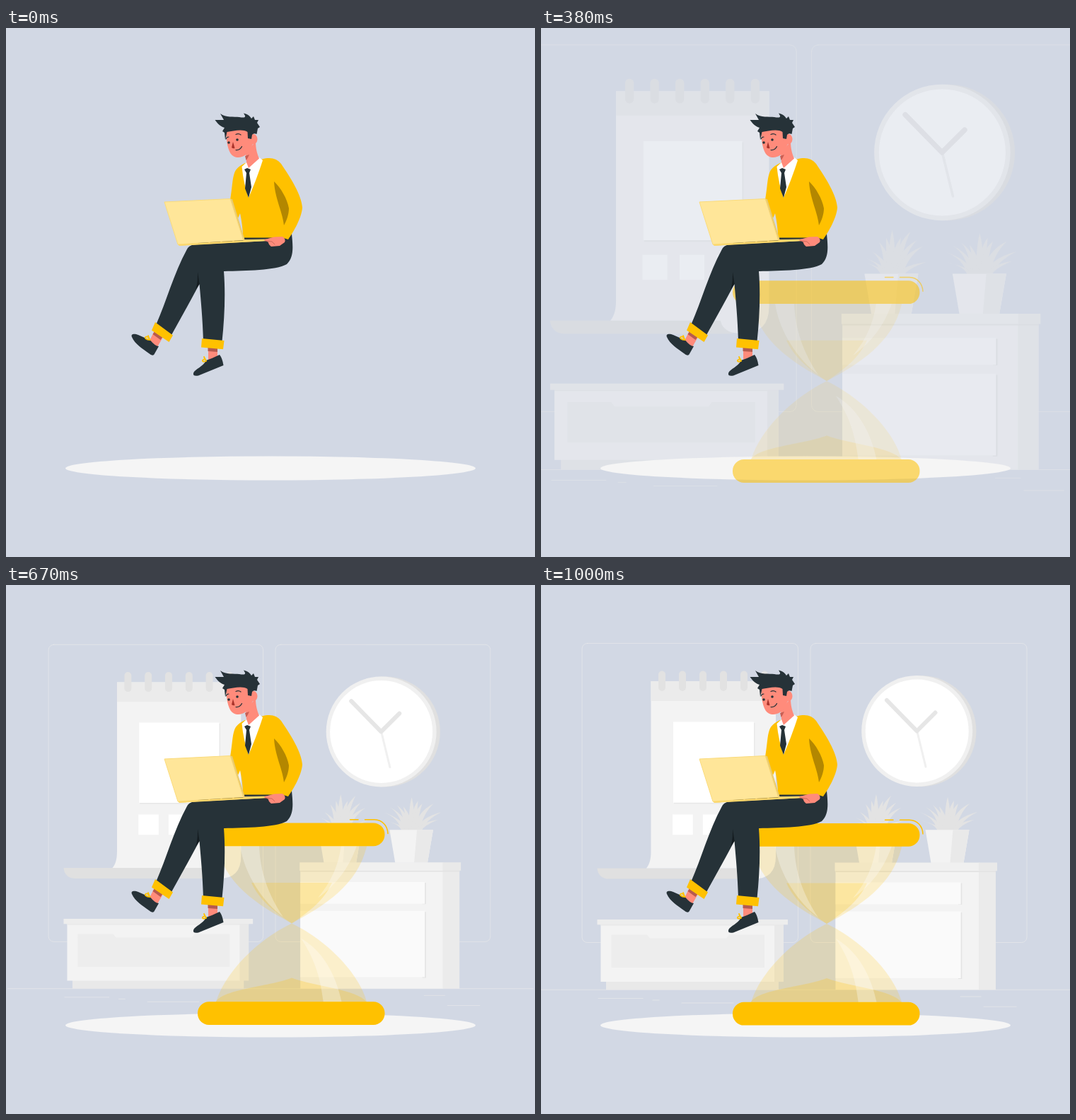
An HTML page that plays this animation: 748 by 748 pixels, repeating every 1040 ms.

```html
<!DOCTYPE html>
<html lang="en">
<head>
<meta charset="utf-8">
<title>Working on an hourglass</title>
<style>
  html, body { margin: 0; width: 100%; height: 100%; overflow: hidden; background: #d2d8e4; }
  svg { display: block; width: 100vw; height: 100vh; }
  .line { fill: none; stroke-linecap: round; stroke-linejoin: round; }
</style>
</head>
<body>
<svg viewBox="0 0 748 748">
  <g id="room" opacity="0">
    <g class="line" stroke="#ebebeb" stroke-width=".75" opacity=".8">
      <rect x="58" y="82.5" width="305.5" height="423" rx="7.5"/>
      <rect x="381" y="82.5" width="306" height="423" rx="7.5"/>
      <path d="M0 572.3H748M81 584.5H144M158 587H167M199 591H272M593 582H622M626 596.3H672"/>
    </g>

    <g id="calendar">
      <path fill="#e0e0e0" d="M79.5 400.5H290V415.5H95C86 415.5 80 409 79.5 400.5Z"/>
      <path fill="#f3f3f3" d="M155.5 136H332V384Q332 415.5 301 415.5Q279 415.5 276 400.5H149C153.500 395 155.500 388 155.500 377Z"/>
      <path fill="#ebebeb" d="M155.500 136H332V164H155.500Z"/>
      <path class="line" stroke="#e2e2e2" stroke-width="10" d="M171 126.500V145M200 126.500V145M229 126.500V145M258 126.500V145M287 126.500V145M316 126.500V145"/>
      <rect x="188" y="195" width="114.500" height="114.500" fill="#e9e9e9"/>
      <path fill="#fff" d="M187 193.500H301V307.700H187ZM186 324.500H214.700V353.300H186ZM228.800 324.500H257.500V353.300H228.800ZM271.600 324.500H300.300V353.300H271.600Z"/>
    </g>

    <g id="clock">
      <circle cx="537" cy="206.500" r="78.500" fill="#e0e0e0"/>
      <circle cx="531.700" cy="206.500" r="78.500" fill="#f0f0f0"/>
      <circle cx="531.700" cy="206.500" r="73" fill="#fff"/>
      <path class="line" stroke="#f0f0f0" stroke-width="3" d="M531.700 206.500L544 257"/>
      <path class="line" stroke="#e6e6e6" stroke-width="6" d="M489 163L531.500 206.500L557.500 180.500"/>
    </g>

    <g id="sideboard">
      <path fill="#e9e9e9" d="M92 560H336V572.300H92ZM329 480H343V561H329Z"/>
      <path fill="#f3f3f3" d="M84.500 480H330V561H84.500Z"/>
      <path fill="#e7e7e7" d="M84.500 480H343V481.500H84.500Z"/>
      <path fill="#ededed" d="M79.500 473H349V480.300H79.500ZM99.500 494.500H150L154 499.500H262L266 494.500H316V541H99.500Z"/>
    </g>

    <g id="plants"></g>

    <g id="cabinet">
      <path fill="#f3f3f3" d="M416.500 404H620V572.300H416.500Z"/>
      <path fill="#ebebeb" d="M619 404H643V572.300H619Z"/>
      <path fill="#e3e3e3" d="M416.500 404H643V406H416.500ZM590 421.500H595.300V452H590ZM590 463H595.300V557H590Z"/>
      <path fill="#fafafa" d="M416.500 420.500H593.700V451.500H416.500ZM416.500 461.500H593.700V556H416.500Z"/>
      <path fill="#f0f0f0" d="M415.500 392.500H620V404.300H415.500Z"/>
      <path fill="#e9e9e9" d="M619 392.500H645V404.300H619Z"/>
    </g>
  </g>

  <ellipse cx="374" cy="622.500" rx="290" ry="17" fill="#f5f5f5"/>

  <g id="hourglass" opacity="0" fill="#ffc100">
    <path opacity=".19" d="M297 366C309 424 356 453 404 479C452 453 499 424 511 366Z"/>
    <path opacity=".19" d="M404 479C352 504 306 553 296 594H511C502 553 456 504 404 479Z"/>
    <path opacity=".21" d="M347 421.500H461C450 446 428 463 404 479C380 463 358 446 347 421.500Z"/>
    <path opacity=".24" d="M296 592C302 572 370 569 404 556C438 569 500 572 511 592Z"/>
    <g fill="#fff" opacity=".3">
      <path d="M331 369C337 410 364 449 392 470C371 439 359 405 358 369Z"/>
      <path d="M496 369C485 401 467 424 441 443C460 420 470 397 474 369Z"/>
      <path d="M417 500C440 535 445 562 449 592H475C466 548 446 517 417 500Z"/>
    </g>
    <rect x="271" y="337" width="264.500" height="32.800" rx="16"/>
    <rect x="271" y="589.800" width="264.500" height="32.800" rx="16"/>
    <path class="line" stroke="#ffc100" stroke-width="1.500" d="M486.500 332.300H498M507.500 332.300H521C532 332.500 539.500 341 540 352"/>
  </g>

  <g id="worker">
    <g id="feet">
      <path fill="#ff8b7b" d="M210 428L222 437L214 451L203 442ZM286 451H299V466L286 469Z"/>
      <path fill="#b55a4f" d="M211 428L222 436L218.500 441L207.500 433ZM285.500 452H299V458L285.500 457Z"/>
      <path fill="#263238" d="M178 437C176 432 182 432 187 434L204 441.500Q211 450 216 450L209.500 461.500Q207 464.500 202 460C194 454 182 447 178 437Z"/>
      <path fill="#263238" d="M265 488C267 482 279 479 283 470Q292 467 302 462Q306 467 307.500 477L272 491.500Q264 493 265 488Z"/>
      <path class="line" stroke="#ffc100" stroke-width="1.800" d="M204 441C198 441 195 438 198 436.500Q201 436 203 440L201 435M283 471C278 473 276 470 280 468.500Q283 468 283 471L280 465"/>
    </g>
    <path fill="#263238" d="M257 311Q261 306 270 306L337 299V295.500L404 291C406 311 407 324 397 334C381 343 340 343 308 344C310.500 375 309 410 305.500 443H279C278 410 275.500 385 273.500 362C260 387 247 411 234 434L212 420C228 384 237 347 257 311Z"/>
    <path fill="#151d21" d="M271 345L273.600 362L268 370C271 361 271 353 271 345Z"/>
    <path fill="#ffc100" d="M211 416L236 434.500L230.500 444L206 427.500ZM277 439L308.500 442L307 454.300L276 451.500Z"/>

    <path fill="#ffc100" d="M338 191L362 185.500C375 182 383 185 389 192C402 211 418 236 419 254C418 268 407 288 399 299L391 296.500H335C335 284 333 272 331 262L328 269L317 243C320 225 320 213 323 205C325 199 330 195 338 191Z"/>
    <path fill="#b38700" d="M379 217C380 240 391 260 393 279C397 272 400 263 400 255C398 242 388 225 379 217Z"/>
    <path fill="#fff" d="M333.500 196L340 190L358 183L363 187C358 203 350 224 343 240Q336 221 333.500 196Z"/>
    <path fill="#ff8b7b" d="M339 177L340 190L343 198L358 184.500C355 178 353 170 353 160Z"/>
    <path fill="#c95f54" d="M338 181L344 179Q342 184 339.500 187Z"/>
    <path fill="#263238" d="M337 200L341 198L346 200L344 205L347 225L343 240L338 227L340 205Z"/>

    <g id="head">
      <path fill="#ff8b7b" d="M311 147C312 165 315 178 322 181.500C331 186 342 180 346 170L349 164C358 165 357 150 350 150L346 140H312Z"/>
      <path fill="#263238" d="M295.500 130L308 130L303 121C311 127 322 125 330 126C335 127 339 127 338 124L336 120.500C343 122 346 126 347 128L350 125L352 130H357L355 134L359 140L356 142L354.500 150Q350 148 348 151L347 157L342 156L341.500 147C334 142 321 146 312.500 147L311.500 152L310 158L309 148L306 146L309 141C303 139 299 135 295.500 130Z"/>
      <g fill="#263238"><circle cx="327" cy="158" r="1.800"/><circle cx="315" cy="162" r="1.800"/></g>
      <path class="line" stroke="#263238" stroke-width="1.200" d="M325 150.500Q329 148.500 332 151M311 157Q312 154 315 154M325 172.500Q331 173 333.500 167.500"/>
      <path fill="#a9332b" d="M321 161L319 169Q321 171 323.500 170Z"/>
    </g>

    <g id="laptop">
      <path fill="#e9cb70" d="M317 241.500L320 242L337.500 299L369 298.500L370 301L244 307.500L334 299Z"/>
      <path fill="#ffe699" stroke="#fadb7c" d="M224 246L317 241.500L335.500 300L243 306Z"/>
      <path class="line" stroke="#7d6c36" stroke-width=".7" stroke-dasharray="14 3" d="M272 304.500L335 300.500"/>
      <path fill="#fcd86b" d="M243 306L366 299L369 301L245 308Z"/>
    </g>
    <path fill="#ff8b7b" d="M364.500 299.500L379 295.500L391 295Q396 298 394 303L387 308L375 309Q371 306 371 303Z"/>
    <path class="line" stroke="#b55a4f" stroke-width=".7" d="M366 301L376 302L380 306"/>
  </g>
</svg>

<script>
  const LOOP = 1040, FPS = 24, LEAD = 0.03;
  const ORIGIN = { x: 374, y: 341.5 };
  const RISE = 44.88;

  const byId = id => document.getElementById(id);
  const room = byId('room'), hourglass = byId('hourglass');

  const leaf = (x, y, [tipX, tipY]) => {
    const bendX = x + (tipX - x) * 0.35, bendY = y + (tipY - y) * 0.7;
    const root = x + (tipX - x) * 0.25;
    return `<path fill="#e3e3e3" d="M${root - 4} ${y}Q${bendX - 4} ${bendY} ${tipX} ${tipY}Q${bendX + 5} ${bendY + 3} ${root + 4} ${y}Z"/>`;
  };

  const plant = (x, tips) => {
    const y = 346.3;
    const pot = `<path fill="#f3f3f3" d="M${x - 31} ${y}H${x + 31}L${x + 23} 393H${x - 23}Z"/>
      <path fill="#e9e9e9" d="M${x + 8} ${y}H${x + 31}L${x + 23} 393H${x + 4}Z"/>`;
    return tips.map(tip => leaf(x, y + 2, tip)).join('') + pot;
  };

  byId('plants').innerHTML =
    plant(473, [[441, 333], [445, 329], [451, 321], [459, 310], [467, 305], [474, 296], [484, 305],
      [495, 298], [502, 308], [509, 315], [513, 333]]) +
    plant(574.5, [[535, 321], [537, 333], [544, 314], [554, 311], [563, 313], [575, 300], [584, 305],
      [590, 309], [606, 309], [617, 321], [612, 332]]);

  const bezier = (a, b, s) => 3 * a * s * (1 - s) ** 2 + 3 * b * s * s * (1 - s) + s ** 3;

  // cubic-bezier(.36, -.01, .5, 1.38), solved by bisection
  function ease(x) {
    if (x >= 1) return 1;
    let low = 0, high = 1;
    for (let i = 0; i < 30; i++) {
      const mid = (low + high) / 2;
      if (bezier(0.36, 0.5, mid) < x) low = mid; else high = mid;
    }
    return bezier(-0.01, 1.38, low);
  }

  function draw(ms) {
    const step = Math.floor((ms % LOOP + 5) * FPS / 1000);
    const p = step < 2 ? 0 : ease(step / FPS + LEAD);
    const opacity = Math.min(1, Math.max(0, p));
    const { x, y } = ORIGIN;
    room.setAttribute('transform', `translate(${x} ${y}) scale(${1.5 - 0.5 * p}) translate(${-x} ${-y})`);
    hourglass.setAttribute('transform', `translate(0 ${RISE * (1 - p)})`);
    room.setAttribute('opacity', opacity);
    hourglass.setAttribute('opacity', opacity);
  }

  const start = performance.now();
  function tick() {
    draw(performance.now() - start);
    requestAnimationFrame(tick);
  }
  tick();
</script>
</body>
</html>
```
